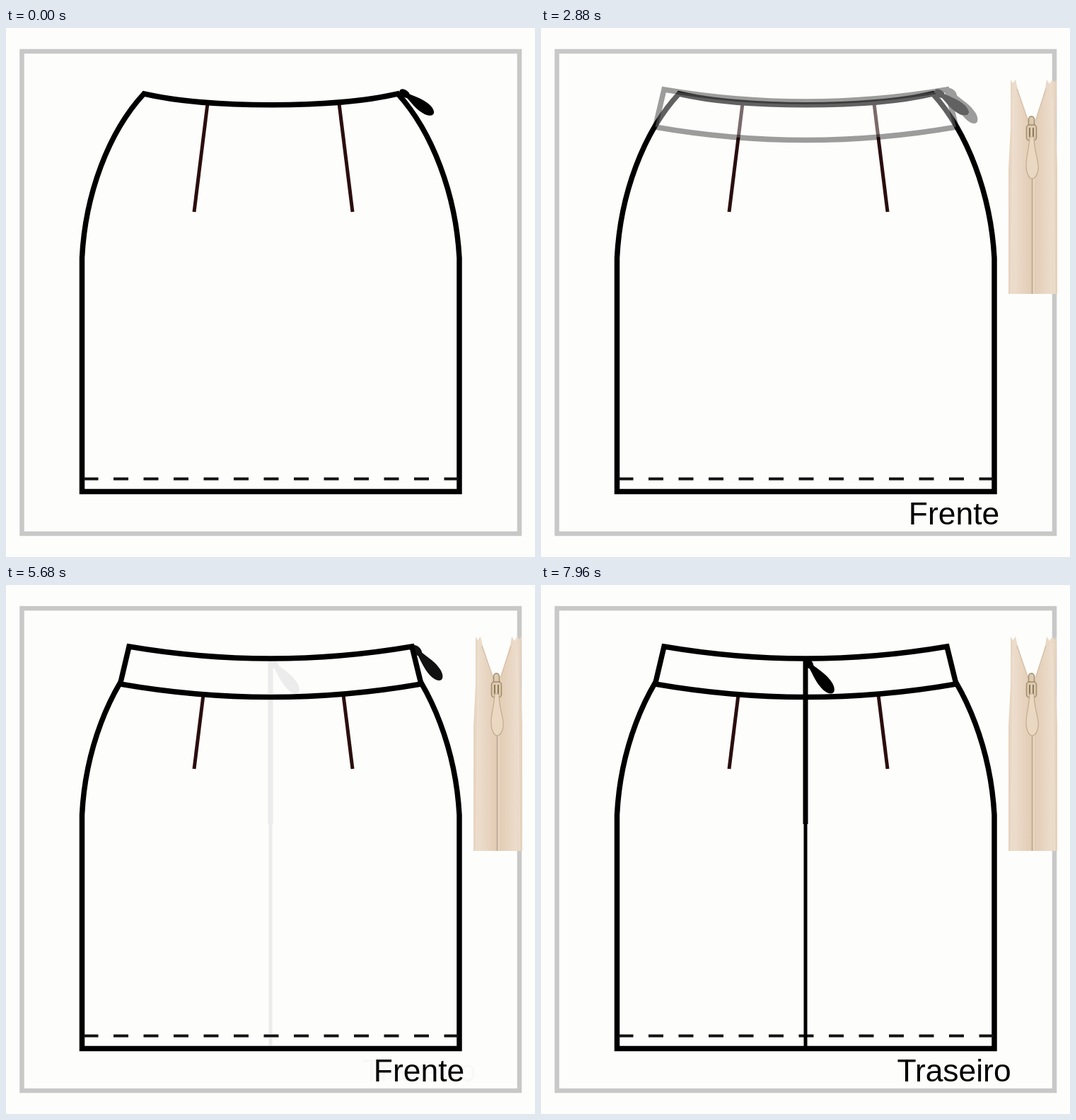
Recreate the animation shown at these times as an HTML page with a canvas. Size 748 px wide and 748 px high, loop 8 s.

```html
<!DOCTYPE html>
<html lang="pt">
<head>
<meta charset="utf-8">
<title>Saia</title>
<style>
  html, body { margin: 0; width: 100%; height: 100%; overflow: hidden; background: #fdfdfb; }
  canvas { display: block; }
</style>
</head>
<body>
<canvas id="stage" width="748" height="748"></canvas>
<script>
const ctx = document.getElementById('stage').getContext('2d');
const LOOP = 8000;
const PAPER = '#fdfdfb';

// Linear progress from 0 to 1 between two times
const ramp = (t, start, end) => Math.min(1, Math.max(0, (t - start) / (end - start)));

function grey(amount) {
  const v = Math.round(253 * (1 - amount));
  return `rgb(${v},${v},${v})`;
}

function line(x1, y1, x2, y2, width, color) {
  ctx.beginPath();
  ctx.moveTo(x1, y1);
  ctx.lineTo(x2, y2);
  ctx.lineWidth = width;
  ctx.strokeStyle = color;
  ctx.stroke();
}

function polygon(points, color) {
  ctx.beginPath();
  points.forEach(([x, y]) => ctx.lineTo(x, y));
  ctx.closePath();
  ctx.fillStyle = color;
  ctx.fill();
}

// Fading ink darkens the paper only, so overlapping parts stay even
function withInk(amount, draw) {
  if (amount <= 0) return;
  ctx.save();
  ctx.globalCompositeOperation = 'darken';
  draw(grey(amount));
  ctx.restore();
}

function pull(x, y, degrees, scale, color) {
  ctx.save();
  ctx.translate(x, y);
  ctx.rotate(degrees * Math.PI / 180);
  ctx.scale(scale, scale);
  ctx.fillStyle = color;
  ctx.beginPath();
  ctx.ellipse(5, 0, 9, 5.5, 0, 0, 2 * Math.PI);
  ctx.fill();
  ctx.beginPath();
  ctx.moveTo(9, -3);
  ctx.bezierCurveTo(24, -6, 34, -10, 48, -8);
  ctx.bezierCurveTo(63, -5, 63, 5, 48, 8);
  ctx.bezierCurveTo(34, 10, 24, 6, 9, 3);
  ctx.closePath();
  ctx.fill();
  ctx.restore();
}

function drawFrame() {
  ctx.fillStyle = PAPER;
  ctx.fillRect(0, 0, 748, 748);
  ctx.lineWidth = 6.5;
  ctx.strokeStyle = '#c8c8c8';
  ctx.strokeRect(22.5, 33, 703.5, 682);
}

function drawSkirt() {
  line(285, 107, 266, 260, 5, '#2a0e0e');
  line(471, 107, 490, 260, 5, '#2a0e0e');
  ctx.beginPath();
  ctx.moveTo(195, 93);
  ctx.bezierCurveTo(145, 147, 112, 235, 107.5, 325);
  ctx.lineTo(107.5, 655.5);
  ctx.lineTo(641, 655.5);
  ctx.lineTo(641, 325);
  ctx.bezierCurveTo(636, 235, 603, 147, 554, 93);
  ctx.bezierCurveTo(465, 114, 285, 114, 195, 93);
  ctx.closePath();
  ctx.lineWidth = 7.5;
  ctx.strokeStyle = '#000';
  ctx.stroke();
  ctx.setLineDash([21, 21.5]);
  line(109.5, 637.5, 640, 637.5, 4, '#111');
  ctx.setLineDash([]);
}

function drawBand(alpha) {
  ctx.save();
  ctx.globalAlpha = alpha;
  ctx.beginPath();
  ctx.moveTo(174, 87);
  ctx.quadraticCurveTo(374, 121, 574, 87);
  ctx.lineTo(587, 140);
  ctx.quadraticCurveTo(374, 177, 161.5, 140);
  ctx.closePath();
  ctx.fillStyle = PAPER;
  ctx.fill();
  ctx.lineWidth = 7.5;
  ctx.strokeStyle = '#000';
  ctx.stroke();
  ctx.restore();
}

function drawBackSeam(color) {
  line(374, 104, 374, 338, 7, color);
  line(374, 338, 374, 656, 5, color);
  pull(375, 107, 50, 1, color);
}

function label(text, alpha) {
  ctx.save();
  ctx.globalAlpha = alpha;
  ctx.fillStyle = '#000';
  ctx.font = '44.4px "Liberation Sans", Arial, sans-serif';
  ctx.textAlign = 'center';
  ctx.fillText(text, 584, 702);
  ctx.restore();
}

function drawZipper(dx, dy) {
  ctx.save();
  ctx.translate(dx, dy);
  const tape = ctx.createLinearGradient(661, 0, 730, 0);
  tape.addColorStop(0, '#e6d3be');
  tape.addColorStop(0.12, '#ecdccb');
  tape.addColorStop(0.45, '#e3cdb6');
  tape.addColorStop(0.55, '#e3cdb6');
  tape.addColorStop(0.88, '#ecdccb');
  tape.addColorStop(1, '#e4d0ba');
  polygon([
    [664, 73], [667, 78], [671, 73], [674, 86], [688, 130], [694, 142],
    [700, 130], [713, 86], [715, 73], [719, 79], [723, 73], [726, 77], [729, 72],
    [728, 140], [730, 200], [730, 376], [661, 376], [661, 200], [664, 140]
  ], tape);
  line(673, 86, 689, 132, 1.5, '#d8c2a9');
  line(714, 86, 699, 132, 1.5, '#d8c2a9');
  line(668, 100, 665, 376, 1, '#f0e4d7');
  line(723, 100, 726, 376, 1, '#f0e4d7');
  line(697, 205, 697, 376, 1, '#ecdfcf');
  line(694.5, 190, 694.5, 376, 1.5, '#b9a68f');

  ctx.strokeStyle = '#a18b6d';
  ctx.fillStyle = '#dccbb0';
  ctx.lineWidth = 1.5;
  ctx.beginPath();
  ctx.roundRect(689.5, 125, 8, 20, 4);
  ctx.fill();
  ctx.stroke();
  ctx.beginPath();
  ctx.roundRect(686.5, 137, 14, 22, 4);
  ctx.fill();
  ctx.stroke();
  line(691, 141, 691, 155, 2, '#8f7959');
  line(696, 141, 696, 155, 2, '#8f7959');
  ctx.strokeStyle = '#c2ab8e';
  ctx.fillStyle = '#ead8c2';
  ctx.lineWidth = 1.2;
  ctx.beginPath();
  ctx.moveTo(691, 154);
  ctx.bezierCurveTo(690, 172, 686, 182, 686, 194);
  ctx.bezierCurveTo(686, 205, 690, 213, 694.5, 213);
  ctx.bezierCurveTo(699, 213, 704, 205, 703, 194);
  ctx.bezierCurveTo(702, 182, 697, 172, 697, 154);
  ctx.closePath();
  ctx.fill();
  ctx.stroke();
  ctx.restore();
}

function render(t) {
  const band = ramp(t, 2570, 3380);
  const back = ramp(t, 5630, 6410);
  const caption = ramp(t, 5660, 6720);
  const slide = 84 * (1 - ramp(t, 120, 960));

  drawFrame();
  drawSkirt();
  drawBand(band);
  withInk(1 - band, color => pull(560, 90, 35.5, 0.92, color));
  withInk(band * (1 - back), color => pull(578, 89, 50, 0.99, color));
  withInk(back, drawBackSeam);
  label('Frente', ramp(t, 90, 690) * (1 - caption));
  label('Traseiro', caption);
  if (t >= 120) drawZipper(slide, -slide / 4);
}

function tick() {
  render(performance.now() % LOOP);
  requestAnimationFrame(tick);
}
tick();
</script>
</body>
</html>
```
